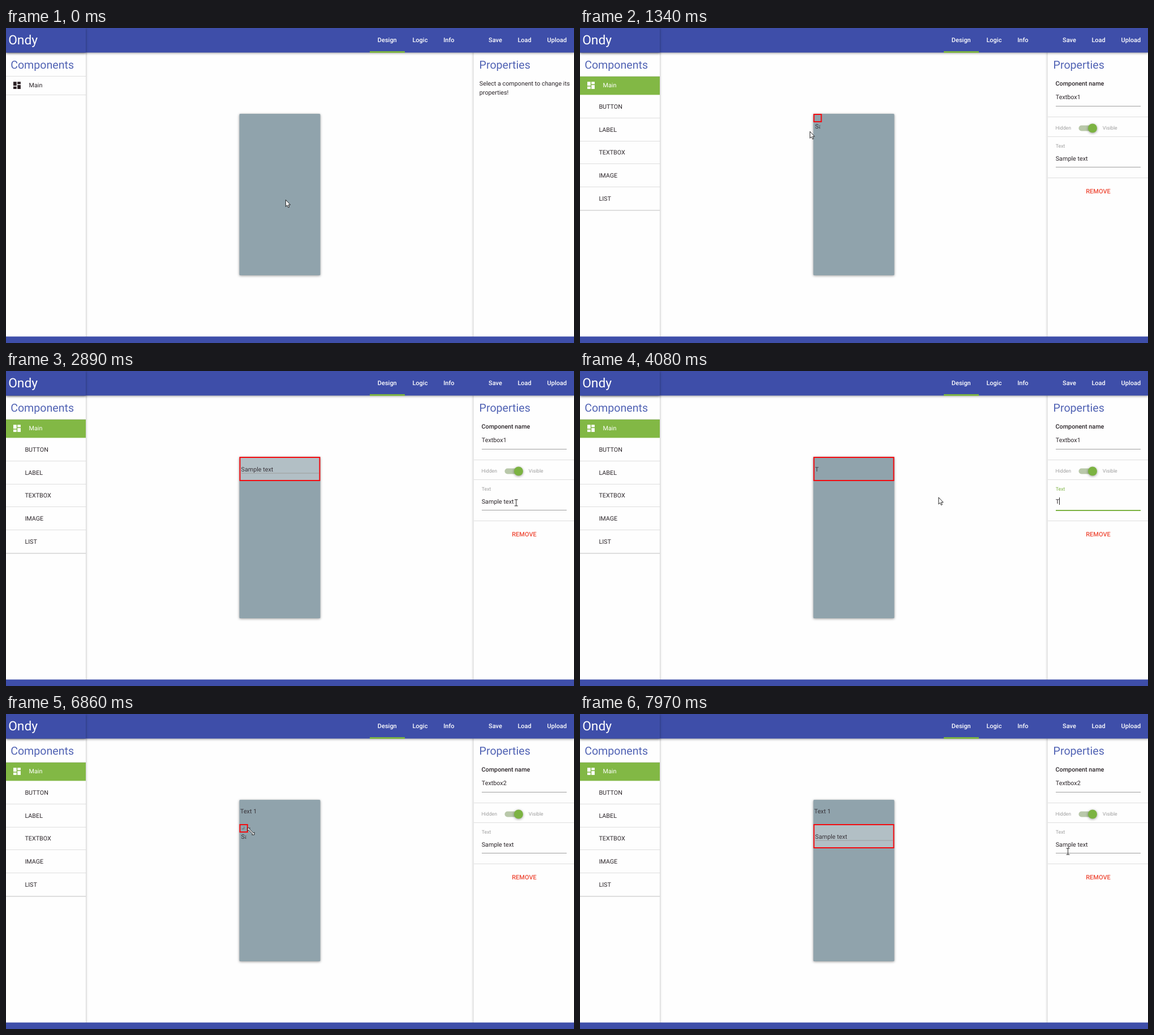
Animation, 1004 px wide and 558 px high, one loop 7990 ms. Source, as an HTML page:

```html
<!DOCTYPE html>
<html lang="en">
<head>
<meta charset="utf-8">
<title>App builder</title>
<style>
html, body { margin: 0; width: 100%; height: 100%; overflow: hidden; background: #fefefe; }
svg { display: block; width: 1004px; height: 558px; }
text { font: 10.77px Roboto, sans-serif; fill: #2b2529; white-space: pre; text-rendering: geometricPrecision; }
.title { font-size: 19.6px; fill: #5163b4; }
.brand { font-size: 22.8px; fill: #fff; }
.nav { font-size: 11px; font-weight: 500; fill: #fff; }
.strong { font-weight: 500; }
.small { font-size: 8.7px; fill: #9e9e9e; }
.remove { font-size: 11px; font-weight: 500; fill: #ee4a37; text-anchor: middle; }
.bar { fill: #3e4ea9; }
.line { fill: #dedede; }
.rule { fill: #9e9e9e; }
.panel { fill: #fefefe; filter: drop-shadow(0 1px 2px rgba(0,0,0,.32)); }
.lift { filter: drop-shadow(0 1px 2px rgba(0,0,0,.4)); }
.boxText { fill: #38343a; }
.frame { fill: none; stroke: #f40b10; stroke-width: 2; }
.pointer path { fill: #fff; stroke: #111; stroke-width: .9; stroke-linejoin: round; }
</style>
</head>
<body>
<svg viewBox="0 0 1004 558">
  <defs>
    <clipPath id="listClip"><rect id="listArea" y="118" width="141" height="0"/></clipPath>
    <clipPath id="textClip"><rect id="textArea" width="12" height="43"/></clipPath>
  </defs>
  <rect width="1004" height="558" fill="#fefefe"/>

  <rect class="lift" x="412.5" y="152" width="143" height="286" rx="1.5" fill="#90a3ac"/>
  <text id="placed" class="boxText" x="414" y="175.7">Text 1</text>
  <g id="box">
    <rect id="field" x="412.5" fill="#fff" fill-opacity=".3"/>
    <rect id="fieldRule" class="rule" x="416" height="1"/>
    <g clip-path="url(#textClip)"><text id="boxText" class="boxText" x="415.5"></text></g>
    <path id="grip" fill="none" stroke="#59656b"/>
    <rect id="frame" class="frame" x="413.5"/>
  </g>

  <rect class="panel" y="40" width="141" height="520"/>
  <rect class="panel" x="826.5" y="40" width="180" height="520"/>

  <text class="title" x="8.2" y="72">Components</text>
  <rect class="line" y="85" width="141" height="1"/>
  <rect id="mainRow" y="86" width="141" height="32.4" fill="#82b845"/>
  <path id="mainIcon" transform="translate(10.8 93) scale(.72)" d="M3 13h8V3H3zM3 21h8v-6H3zM13 21h8V11h-8zM13 3v6h8V3z"/>
  <text id="mainText" x="40.6" y="105.3">Main</text>
  <rect id="listEnd" class="line" width="141" height="1"/>
  <g id="list" clip-path="url(#listClip)"></g>

  <text class="title" x="836.6" y="72">Properties</text>
  <g id="hint">
    <text x="836.8" y="102">Select a component to change its</text>
    <text x="836.8" y="117.7">properties!</text>
  </g>
  <g id="props">
    <text class="strong" x="840.6" y="102">Component name</text>
    <text id="name" x="840.8" y="126.3"></text>
    <rect class="rule" x="841" y="138" width="150" height="1"/>
    <rect class="line" x="827" y="157" width="177" height="1"/>
    <text class="small" x="840.5" y="180">Hidden</text>
    <rect x="881.5" y="172.5" width="27" height="10" rx="5" fill="#b9c8aa"/>
    <circle class="lift" cx="906" cy="177.5" r="8" fill="#7cb342"/>
    <text class="small" x="923.8" y="180">Visible</text>
    <rect class="line" x="827" y="192" width="177" height="1"/>
    <text id="label" class="small" x="840.8" y="211.5">Text</text>
    <rect id="select" y="223" height="15" fill="#3390ff"/>
    <text id="value" x="840.7" y="234.5"></text>
    <rect id="caret" y="224" width="1" height="13" fill="#222"/>
    <rect id="valueRule" x="841" y="246" width="150"/>
    <rect class="line" x="827" y="265" width="177" height="1"/>
    <text class="remove" x="916" y="293.2">REMOVE</text>
  </g>

  <rect class="bar lift" width="1004" height="43.5"/>
  <rect class="bar lift" width="141" height="43.5"/>
  <text class="brand" x="4.2" y="28.8">Ondy</text>
  <g id="nav"></g>
  <rect x="643" y="41" width="62" height="3" fill="#7cb342"/>
  <rect class="bar" y="546.5" width="1004" height="12"/>

  <g id="pointer" class="pointer">
    <path id="arrow" d="M.4 .4V12.4L3 9.8L4.9 14L6.8 13.2L5 9.2H8.6Z"/>
    <path id="hand" d="M-1.4 1.4C-1.4 -.2 1.2 -.2 1.2 1.4V6.2C2 5.6 3.6 5.8 3.8 6.8C4.8 6.3 6 6.6 6.2 7.6C7.2 7.3 7.6 7.8 7.6 8.8V12C7.6 14 6.4 14.5 6.4 16.5H-.5C-.6 14.5 -4.4 11 -4.6 9.2C-4.6 7.8 -2.8 8 -1.4 10Z"/>
    <path id="ibeam" d="M-3-5.5H3M0-5.5V5.5M-3 5.5H3"/>
    <path id="resize" d="M-6-6H-1.5L-3-4.5L4.5 3L6 1.5V6H1.5L3 4.5L-4.5-3L-6-1.5Z"/>
  </g>
</svg>
<script>
const LOOP = 7990;
const OPEN = 490, ADD1 = 1050, DRAG1 = 1820, FOCUS = 2900, BLUR = 5930, ADD2 = 5970, DRAG2 = 6860;
const el = {};
document.querySelectorAll('[id]').forEach(e => el[e.id] = e);

const set = (e, attrs) => { for (const k in attrs) e.setAttribute(k, attrs[k]); };
const show = (e, on) => e.style.display = on ? '' : 'none';
const write = (e, s) => { if (e.textContent !== s) e.textContent = s; };
const within = (v, a, b) => v >= a && v < b;

function add(parent, tag, attrs, text = '') {
  const e = document.createElementNS('http://www.w3.org/2000/svg', tag);
  set(e, attrs);
  e.textContent = text;
  parent.append(e);
}

[['Design', 656.8], ['Logic', 718.4], ['Info', 773.2], ['Save', 853], ['Load', 904.4], ['Upload', 956.6]]
  .forEach(([s, x]) => add(el.nav, 'text', { class: 'nav', x, y: 24.5 }, s));
['BUTTON', 'LABEL', 'TEXTBOX', 'IMAGE', 'LIST'].forEach((s, i) => {
  const y = 118.4 + 40.8 * i;
  add(el.list, 'text', { x: 33.4, y: y + 24.4 }, s);
  add(el.list, 'rect', { class: 'line', y: Math.round(y + 40.4), width: 141, height: 1 });
});

// time, x, y of the pointer
const path = [
  [0, 494, 304], [30, 494, 304], [430, 66, 101], [520, 66, 101], [800, 84, 220], [1020, 84, 220],
  [1340, 406, 183], [1800, 433, 165], [1820, 433, 165], [2170, 556, 195], [2330, 590, 206],
  [2590, 732, 241], [2780, 880, 258], [2900, 902, 233], [2960, 902, 233], [3380, 633.5, 223.5],
  [5140, 633.5, 223.5], [5480, 380, 182], [5840, 97, 225], [5885, 97, 225], [5940, 156, 222],
  [6310, 439, 204], [6440, 439, 204], [6630, 433, 208], [6860, 433, 208], [7490, 570, 232],
  [7660, 570, 232], [7800, 700, 247], [7970, 862.5, 243.5], [LOOP, 862.5, 243.5]
];
const typed = [[0, 'Sample text'], [4080, 'T'], [4180, 'Te'], [4350, 'Tex'], [4440, 'Text'],
  [4530, 'Text '], [4730, 'Text 1'], [ADD2, 'Sample text']];
// time, width, height of the dragged box
const size1 = [[DRAG1, 15, 15], [2170, 127.5, 40], [2240, 143, 43]];
const size2 = [[DRAG2, 15, 15], [7230, 127.5, 40], [7330, 143, 43]];

function slope(p, i, k) {
  if (i < 1 || i > p.length - 2) return 0;
  const a = (p[i][k] - p[i - 1][k]) / (p[i][0] - p[i - 1][0]);
  const b = (p[i + 1][k] - p[i][k]) / (p[i + 1][0] - p[i][0]);
  return a * b <= 0 ? 0 : 2 * a * b / (a + b);
}

// monotone curve through the points
function smooth(p, t, k) {
  let i = 0;
  while (i < p.length - 2 && t >= p[i + 1][0]) i++;
  const d = p[i + 1][0] - p[i][0], u = (t - p[i][0]) / d, v = 1 - u;
  return p[i][k] * v * v * (1 + 2 * u) + p[i + 1][k] * u * u * (3 - 2 * u)
    + d * (slope(p, i, k) * u * v * v - slope(p, i + 1, k) * u * u * v);
}

function linear(p, t, k) {
  if (t <= p[0][0]) return p[0][k];
  for (let i = 1; i < p.length; i++) {
    if (t < p[i][0]) {
      const u = (t - p[i - 1][0]) / (p[i][0] - p[i - 1][0]);
      return p[i - 1][k] + (p[i][k] - p[i - 1][k]) * u;
    }
  }
  return p[p.length - 1][k];
}

function drawList(t) {
  const u = Math.min(1, Math.max(0, (t - OPEN) / 355));
  const h = 204.6 * (1 - (1 - u) ** 4), open = t >= OPEN;
  set(el.listArea, { height: h + .4 });
  set(el.listEnd, { y: Math.round(118 + h) });
  show(el.mainRow, open);
  set(el.mainIcon, { fill: open ? '#fff' : '#2b2024' });
  el.mainText.style.fill = open ? '#fff' : '';
}

function drawBox(t, text) {
  const second = t >= ADD2, top = second ? 195 : 152;
  const size = second ? size2 : size1, start = size[0][0];
  const w = linear(size, t, 1), h = linear(size, t, 2);
  const fw = linear(size, t - 110, 1);
  const lit = t > start + 30 && (second || t < FOCUS);
  show(el.box, t >= ADD1);
  show(el.placed, second);
  show(el.field, lit);
  show(el.fieldRule, lit);
  set(el.field, { y: top, width: fw, height: 43 });
  set(el.fieldRule, { y: top + 28.5, width: Math.max(0, fw - 6) });
  set(el.textArea, { x: 412.5, y: top, width: Math.max(12, fw - 3) });
  set(el.boxText, { y: top + 25.8 });
  write(el.boxText, text);
  set(el.frame, { y: top + 1, width: w - 2, height: h - 2 });
  set(el.grip, { d: `M${412.5 + w - 11} ${top + h - 6.5}h4v-4` });
  show(el.grip, within(t, 1560, 2260) || within(t, 6480, 7360));
}

function drawProps(t, text, x) {
  const focus = within(t, FOCUS, BLUR), green = '#7cb342';
  show(el.hint, t < ADD1);
  show(el.props, t >= ADD1);
  write(el.name, t < ADD2 ? 'Textbox1' : 'Textbox2');
  write(el.value, text);
  el.label.style.fill = focus ? green : '';
  set(el.valueRule, { height: focus ? 2 : 1, fill: focus ? green : '#9e9e9e' });

  const selecting = within(t, 2960, 4080), from = Math.max(841, x);
  show(el.select, selecting);
  set(el.select, { x: from, width: Math.max(0, 897.5 - from) });
  el.value.style.fill = selecting && from === 841 ? '#fff' : '';

  const caret = within(t, 4080, 5160);
  show(el.caret, caret);
  if (caret) set(el.caret, { x: Math.round(840.7 + el.value.getComputedTextLength()) });
}

function drawPointer(t, x, y) {
  let kind = 'arrow';
  if (within(t, 1560, 1900) || within(t, 6480, 6950)) kind = 'resize';
  else if (x < 141 && within(y, 86, 323)) kind = 'hand';
  else if (t >= ADD1 && within(x, 841, 991) && within(y, 218, 247)) kind = 'ibeam';
  for (const k of ['arrow', 'hand', 'ibeam', 'resize']) show(el[k], k === kind);
  set(el.pointer, { transform: `translate(${x.toFixed(1)} ${y.toFixed(1)})` });
}

function draw(t) {
  const x = smooth(path, t, 1), y = smooth(path, t, 2);
  const text = typed.filter(s => s[0] <= t).pop()[1];
  drawList(t);
  drawBox(t, text);
  drawProps(t, text, x);
  drawPointer(t, x, y);
}

const begin = performance.now();
function tick() {
  draw((performance.now() - begin) % LOOP);
  requestAnimationFrame(tick);
}
tick();
</script>
</body>
</html>
```
